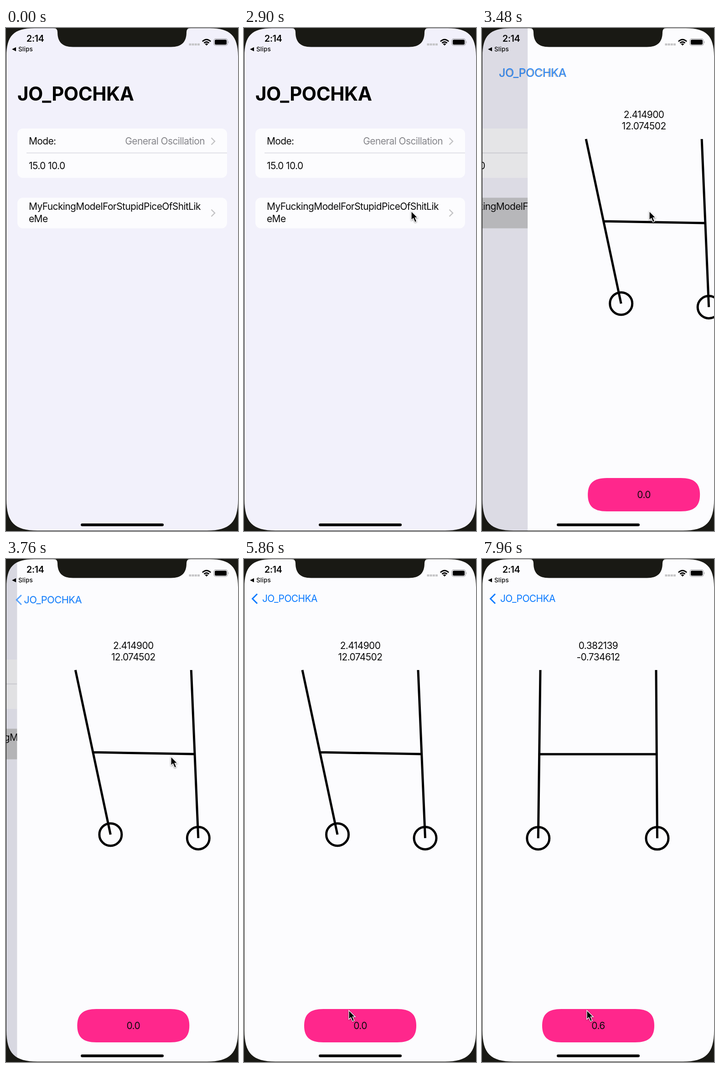
Write an HTML page that moves like this. It is 509 by 1101 pixels and loops after 8000 ms.

```html
<!DOCTYPE html>
<html>
<head>
<meta charset="utf-8">
<style>
  html, body { margin: 0; width: 100%; height: 100%; overflow: hidden; background: #191914; }
  svg { display: block; width: 509px; height: 1101px; }
  text { font: 20.9px Inter, "Liberation Sans", sans-serif; letter-spacing: -.027em; fill: #0a0a0a; white-space: pre; }
  .mid { text-anchor: middle; }
  .end { text-anchor: end; fill: #85858a; }
  .clock { font-size: 20px; font-weight: 600; }
  .back { font-size: 13.5px; font-weight: 500; letter-spacing: .01em; }
  .large { font-size: 41.8px; font-weight: 700; letter-spacing: -.009em; fill: #000; }
  .link { fill: #0a7aff; }
  .line { fill: none; stroke: #000; stroke-width: 5; }
  .more { fill: none; stroke: #c2c2c4; stroke-width: 2.4; }
  .card { fill: #fcfcfe; }
  .card.pressed { fill: #c9c9cc; }
</style>
</head>
<body>
<svg viewBox="0 0 509 1101">
  <rect width="509" height="1101" fill="#f2f1fb"/>

  <g id="list">
    <rect class="card" x="25" y="220" width="460" height="108" rx="12"/>
    <path d="M45 273.5H485" stroke="#d8d8de" stroke-width="1.3"/>
    <text x="50" y="255">Mode:</text>
    <text class="end" x="436" y="255">General Oscillation</text>
    <path class="more" d="M450.5 240.5l7.5 7.5l-7.5 7.5"/>
    <text x="50" y="309">15.0 10.0</text>
    <rect id="row" class="card" x="25" y="371.5" width="460" height="67" rx="12"/>
    <text x="50" y="398">MyFuckingModelForStupidPiceOfShitLik</text>
    <text x="50" y="425">eMe</text>
    <path class="more" d="M450.5 397.5l7.5 7.5l-7.5 7.5"/>
  </g>
  <rect id="dim" width="509" height="1101"/>

  <g id="page">
    <rect class="card" width="509" height="1101"/>
    <text id="right" class="mid" x="255" y="197"></text>
    <text id="left" class="mid" x="255" y="222"></text>
    <path id="rods" class="line"/>
    <circle id="bobL" class="line" r="24.5"/>
    <circle id="bobR" class="line" r="24.5"/>
    <path fill="#ff278c" d="M132 1021.5C132 997 144 985 174 985H336C366 985 378 997 378 1021.5S366 1058 336 1058H174C144 1058 132 1046 132 1021.5Z"/>
    <text id="time" class="mid" x="255" y="1029"></text>
  </g>

  <g id="title">
    <text id="large" class="large" y="15.2">JO_POCHKA</text>
    <text id="small" class="link" y="16" transform="scale(2.117)">JO_POCHKA</text>
  </g>
  <path id="chevron" d="M29 76.5L18.5 87L29 97.5" fill="none" stroke="#0a7aff" stroke-width="3"/>

  <g id="status">
    <text class="clock mid" x="64" y="29.5">2:14</text>
    <path d="M13 46.5L22 42V51Z"/>
    <text class="back" x="27" y="51">Slips</text>
    <path d="M401.5 36H425" stroke="#c4c4c6" stroke-width="4.5" stroke-dasharray="5 1.17"/>
    <g fill="none" stroke="#000" stroke-width="3">
      <path d="M431 29.5Q440 21 449 29.5"/>
      <path d="M434.5 33Q440 28 445.5 33"/>
    </g>
    <path d="M440 38.5L436.5 35Q440 32 443.5 35Z"/>
    <rect x="456" y="23.5" width="30" height="15" rx="4.5" fill="none" stroke="#98989c" stroke-width="1.2"/>
    <rect x="458" y="25.5" width="26" height="11" rx="2.5"/>
    <path d="M487.5 28.5q2 2.5 0 5z" fill="#98989c"/>
    <rect x="164" y="1084.4" width="182" height="6" rx="3"/>
  </g>

  <g fill="#191914">
    <path fill-rule="evenodd" d="M0 0H509V1101H0Z M1 62C1 17 17 0.5 62 0.5H447C492 0.5 509 17 509 62V1032C509 1082 491 1100 441 1100H69C19 1100 1 1082 1 1032Z"/>
    <path d="M104 0Q113 0 113 9C113 30 123 41.5 147 41.5H362C386 41.5 396 30 396 9Q396 0 405 0Z"/>
  </g>

  <path id="cursor" d="M0 0V19.5L4.5 15.5L8 24L11.8 22.4L8.3 14.2H14.2Z"
    stroke="#fff" stroke-width="1.3" style="filter:drop-shadow(0 1.5px 1.5px #0007)"/>
</svg>
<script>
const $ = id => document.getElementById(id);
const set = (id, attrs) => { for (const k in attrs) $(id).setAttribute(k, attrs[k]); };
const clamp = v => Math.max(0, Math.min(1, v));
const mix = (a, b, k) => a + (b - a) * k;
const ease = (t, start, length) => { const k = clamp((t - start) / length); return k * k * (3 - 2 * k); };

// Critically damped spring from 0 to 1
const spring = (t, start, rate) => {
  const k = Math.max(0, t - start) / 1000 * rate;
  return 1 - (1 + k) * Math.exp(-k);
};

const ROD = 368.3, TOP = 243, LEFT = 128, RIGHT = 382;

function pendulums(time) {
  // Sum and difference modes of the coupled pair, in degrees
  const phase = 3.14 / 12;
  const sum = 7.5 * Math.cos(phase + 2.22105 * time);
  const diff = 5 * Math.cos(phase + 2.368397 * time);
  const l = sum + diff, r = sum - diff;
  const at = (x, deg, k) => {
    const a = deg * Math.PI / 180;
    return [x + Math.sin(a) * ROD * k, TOP + Math.cos(a) * ROD * k];
  };
  const bobL = at(LEFT, l, 1), bobR = at(RIGHT, r, 1);
  set("rods", { d: `M${LEFT} ${TOP}L${bobL}M${RIGHT} ${TOP}L${bobR}M${at(LEFT, l, .5)}L${at(RIGHT, r, .5)}` });
  set("bobL", { cx: bobL[0], cy: bobL[1] });
  set("bobR", { cx: bobR[0], cy: bobR[1] });
  $("left").textContent = l.toFixed(6);
  $("right").textContent = r.toFixed(6);
  $("time").textContent = time.toFixed(1);
}

function push(t) {
  const p = spring(t, 3007.5, 6.37), q = spring(t, 3049, 6.9);
  set("list", { transform: `translate(${-152.7 * p})` });
  set("row", { class: t > 2940 ? "card pressed" : "card" });
  set("dim", { opacity: .11 * p });
  set("page", { transform: `translate(${509 * (1 - p)})` });
  set("title", { transform: `translate(${mix(25, 40, q)} ${mix(144, 86.5, q)}) scale(${mix(1, .4724, q)})` });
  set("large", { opacity: 1 - q });
  set("small", { opacity: q, y: 7.6 });
  set("chevron", { opacity: clamp((q - .87) / .13), transform: `translate(${100 * (1 - p)} ${57 * (1 - q)})` });
}

function cursor(t) {
  const enter = ease(t, 60, 840), tap = ease(t, 2200, 550);
  const x = 520 - 145 * enter - 8 * tap - 137 * ease(t, 3640, 1040);
  const y = 800 - 347 * enter - 52 * tap + 587 * ease(t, 3563, 1407);
  set("cursor", { transform: `translate(${x} ${y})` });
}

function draw() {
  const t = performance.now() % 8000;
  push(t);
  pendulums(.6 * clamp((t - 6500) / 1460));
  cursor(t);
  requestAnimationFrame(draw);
}
draw();
</script>
</body>
</html>
```
